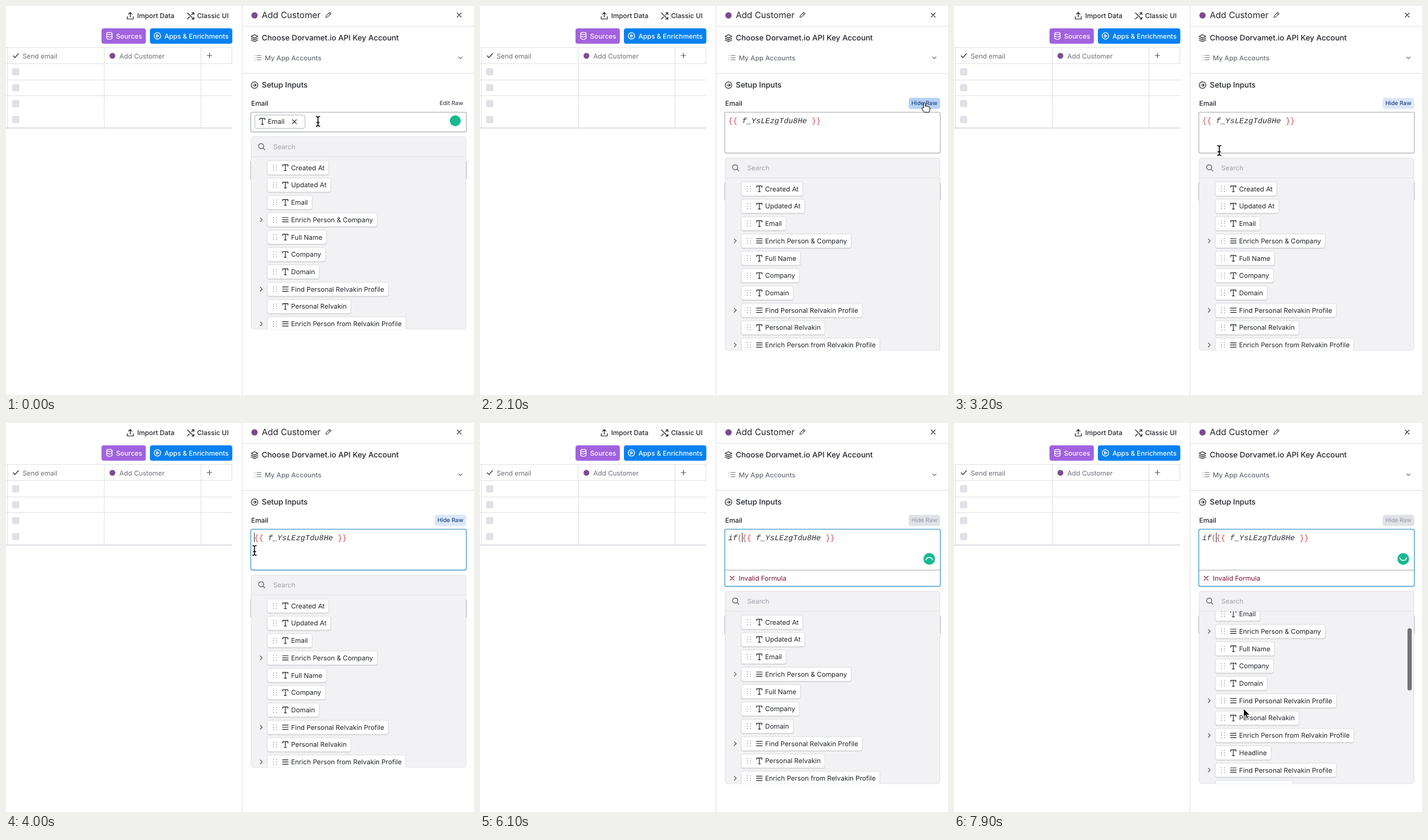
Recreate the animation shown at these times as an HTML page. Size 774 by 644 pixels, loop 8000 ms.

```html
<!DOCTYPE html>
<html lang="en">
<head>
<meta charset="utf-8">
<title>Edit raw formula</title>
<style>
html, body { margin: 0; width: 100%; height: 100%; overflow: hidden; background: #fff; }
svg { display: block; }
text { font: 400 11px Inter, sans-serif; fill: #22252b; white-space: pre; text-rendering: geometricPrecision; }
.m { font-weight: 500; }
.h { font-size: 12.6px; font-weight: 500; }
.s { font-size: 9.5px; font-weight: 500; }
.grey { fill: #6b7078; }
.w { fill: #fff; }
.code { font: italic 12.78px "Liberation Mono", monospace; fill: #2d2f36; }
.red { fill: #cf4a50; font-style: normal; }
.i { fill: none; stroke: #24272d; stroke-width: 1.2; stroke-linecap: round; stroke-linejoin: round; }
.line { fill: none; stroke: #e1e2e7; }
.chip { fill: #fff; stroke: #dcdde2; filter: drop-shadow(0 1px .6px #0002); }
.hover .chip { filter: drop-shadow(0 1px 1.2px #0006); }
</style>
</head>
<body>
<svg id="stage" width="774" height="644" viewBox="0 0 774 644">
  <defs>
    <clipPath id="view"><path d="M406 250H760.500V531q0 4-4 4H410q-4 0-4-4z"/></clipPath>
    <path id="T" class="i" d="M-4.300-2.500V-4.800H4.300V-2.500M0-4.800V4.800M-1.800 4.800H1.800"/>
    <path id="bars" class="i" d="M-4.800-3.600H4.800M-4.800 0H4.800M-4.800 3.600H4.800"/>
    <path id="cross" class="i" d="M-3.300-3.300L3.300 3.300M3.300-3.300L-3.300 3.300"/>
  </defs>

  <!-- table side -->
  <path class="i" d="M205.500 18.500V11M202.500 13.700L205.500 10.700 208.500 13.700M200.500 17.500V21.500H210.500V17.500"/>
  <text class="m" x="217" y="20">Import Data</text>
  <path class="i" d="M300 11.500L310.500 21.500M300 21.500L303.500 18M307 14.500L310.500 11.500M307.500 11.200H310.800V14.500M307.500 21.700H310.800V18.400"/>
  <text class="m" x="316" y="20">Classic UI</text>
  <rect x="158" y="37" width="73.300" height="25.400" rx="4" fill="#a162df"/>
  <rect x="238" y="37" width="136.300" height="25.400" rx="4" fill="#0881f2"/>
  <g class="i" style="stroke:#fff">
    <ellipse cx="171" cy="45.500" rx="4.500" ry="1.800"/>
    <path d="M166.500 45.500V53.500Q171 57 175.500 53.500V45.500M166.500 49.500Q171 53 175.500 49.500"/>
    <circle cx="250.500" cy="49.500" r="5.300"/>
    <path d="M249 47.200V51.800L252.800 49.500Z"/>
  </g>
  <text class="m w" x="182" y="53.500">Sources</text>
  <text class="m w" x="262" y="53.500">Apps &amp; Enrichments</text>
  <path class="line" d="M0 68.500H374M0 95.500H374M0 122.500H374M0 148.500H374M2.500 68V202M162.500 68V202M322.500 68V202M373.500 68V95"/>
  <path class="line" d="M0 202H374" style="stroke:#d5d6dc;stroke-width:1.500"/>
  <path class="i" d="M12 82.500L14.800 85.300 20.500 79"/>
  <text x="27.500" y="86.500" class="grey">Send email</text>
  <circle cx="176" cy="82.500" r="4.800" fill="#7b4c8f"/>
  <text x="187.500" y="86.500" class="grey">Add Customer</text>
  <path class="i" style="stroke:#55585f" d="M332.500 82H340.500M336.500 78V86"/>
  <g id="boxes" fill="#e0e0e6"></g>

  <!-- side panel -->
  <path class="line" d="M390.500 0V644M391 33.500H774M391 111.500H774"/>
  <circle cx="411" cy="15.500" r="5.200" fill="#7b4c8f"/>
  <text x="423" y="20" style="font-size:14.300px">Add Customer</text>
  <path class="i" style="stroke:#55585f" d="M529 19L529.800 15.800 535.300 10.300 537.600 12.600 532 18.200ZM533.800 11.800L536.100 14.100"/>
  <use href="#cross" x="749.500" y="15"/>
  <path class="i" d="M411 47.500L416.500 50.300 411 53.100 405.500 50.300ZM405.500 53.300L411 56.100 416.500 53.300M405.500 56.200L411 59 416.500 56.200"/>
  <text class="h" x="423" y="57.300">Choose Dorvamet.io API Key Account</text>
  <path class="i" style="stroke:#6b7078" d="M415 82H422M415 85.500H422M415 89H422M411.800 82H412M411.800 85.500H412M411.800 89H412M748.800 84.500L751.500 87.200 754.200 84.500"/>
  <text class="m grey" x="428" y="89.500">My App Accounts</text>
  <circle class="i" cx="411" cy="131" r="5.400"/>
  <path class="i" d="M408.300 131H413.500M411.500 128.800L413.700 131 411.500 133.200"/>
  <text class="h" x="423" y="135.300">Setup Inputs</text>
  <text class="m" x="405.500" y="165">Email</text>
  <rect id="rawBg" x="709" y="152" width="52" height="18.500" rx="4"/>
  <text id="rawText" class="s" y="164.300"></text>

  <g id="drop">
    <path class="line" style="stroke:#c3c6cc" d="M404.500 257V287M761.500 257V287"/>
    <rect x="405.500" y="216.500" width="355" height="318.500" rx="4" fill="#f2f2f4" stroke="#e2e3e7"/>
    <path class="line" d="M406 249.500H760.500"/>
    <circle class="i" cx="422" cy="232" r="4.200" style="stroke:#55585f"/>
    <path class="i" style="stroke:#55585f" d="M425.200 235.200L428 238"/>
    <text x="442" y="237" style="fill:#a0a3aa">Search</text>
    <g clip-path="url(#view)">
      <g id="rows"></g>
      <rect id="thumb" x="750" width="7" height="103" rx="3.500" fill="#737376"/>
    </g>
  </g>

  <rect id="field" x="404.800" y="175.900" width="356.600" rx="3" fill="#fff" stroke-width="1.300"/>
  <g id="pill">
    <rect x="411.500" y="180.500" width="83" height="22" rx="3" fill="#fff" stroke="#b4b8bf"/>
    <use href="#T" x="424" y="191"/>
    <text x="433" y="195">Email</text>
    <use href="#cross" x="477" y="191.500"/>
  </g>
  <g id="raw">
    <text class="code" x="410.500" y="194"><tspan id="typed"></tspan><tspan id="paren" class="red"></tspan><tspan class="red">{{</tspan> f_YsLEzgTdu8He <tspan class="red">}}</tspan></text>
    <path id="caret" d="M0 181.500V197.500" stroke="#26282e"/>
  </g>
  <g id="error">
    <path d="M405 243.500H761" stroke="#a9adb5"/>
    <path class="i" style="stroke:#7d1230" d="M413.700 253.700L420.300 260.300M420.300 253.700L413.700 260.300"/>
    <text x="428" y="261" style="fill:#7d1230">Invalid Formula</text>
  </g>
  <g id="badge">
    <circle r="9" fill="#15b98f"/>
    <path id="spin" d="M-1.500-5.100A5.300 5.300 0 0 1 -1.500 5.100" fill="none" stroke="#fff" stroke-width="1.500" stroke-linecap="round"/>
  </g>

  <g id="mouse">
    <path id="arrow" d="M0 0V14L3.300 11 5.500 16 7.900 15 5.700 10.200H10.200Z" fill="#000" stroke="#fff" stroke-width=".9"/>
    <path id="beam" class="i" style="stroke:#000;stroke-width:1.500" d="M-3-8Q0-8 0-6Q0-8 3-8M0-6V6M-3 8Q0 8 0 6Q0 8 3 8M-2 2H2"/>
    <g fill="#fff" stroke="#000" stroke-linejoin="round">
      <path id="point" d="M-1.500 9V1Q0-1.500 1.500 1V6Q3 4.500 4.200 6.300Q6 5.200 6.900 7Q9 6.300 9 8.500V12L7.500 16H0L-4.500 10Q-4 7.500-1.500 9Z"/>
      <path id="palm" d="M-3.500 2.500L-5.500-3.500Q-5-6-3.300-4.500L-1.500-1 -2-6.500Q-.5-8.800.5-6.500L1-1.500 2-6.500Q3.500-8.300 4.300-6L3.800-.8 5.300-4Q7-5 7.200-3L5.800 4 4.500 8H-3L-8 1.800Q-8-.5-6-.2Z"/>
    </g>
  </g>
</svg>

<script>
const $ = id => document.getElementById(id);
const show = (id, on) => $(id).setAttribute("display", on ? "inline" : "none");
const put = (id, attrs) => {
  for (const k in attrs) $(id).setAttribute(k, attrs[k]);
};

const LOOP = 8000, PITCH = 28.72, CHAR = 7.67;
const FOCUS = 300, OPEN = 1900, REFOCUS = 3800, TYPE = 4500, FAIL = 5100, BACK = 7100, GRAB = 7400, SCROLL = 7700;

// A leading ">" marks an expandable group.
const fields = ["Created At", "Updated At", "Email", ">Enrich Person & Company", "Full Name",
  "Company", "Domain", ">Find Personal Relvakin Profile", "Personal Relvakin",
  ">Enrich Person from Relvakin Profile", "Headline", ">Find Personal Relvakin Profile", "Personal Emails"];

// time, x, y, shape; positions are linear between stops
const path = [
  [0, 516, 191, "beam"], [100, 511, 191, "beam"], [200, 511, 191, "beam"], [600, 470, 190, "arrow"],
  [1000, 418, 188, "arrow"], [1200, 414, 187, "arrow"], [1300, 500, 184, "arrow"], [1400, 650, 172, "arrow"],
  [1500, 726, 160, "point"], [1600, 726, 160, "point"], [1800, 735, 160, "point"], [2200, 735, 160, "point"],
  [2400, 670, 158, "arrow"], [2500, 618, 158, "arrow"], [2800, 510, 215, "beam"], [3100, 450, 248, "beam"],
  [3400, 416, 222, "beam"], [3700, 411, 211, "beam"], [BACK, 411, 211, "beam"], [7200, 420, 270, "arrow"],
  [GRAB, 470, 450, "palm"], [7500, 479, 473, "palm"], [SCROLL, 479, 473, "arrow"], [LOOP, 479, 473, "arrow"]
];

function buildRows() {
  const dots = [-4, 0, 4].map(y => `<circle cx="442.300" cy="${y}" r=".9"/><circle cx="447.300" cy="${y}" r=".9"/>`).join("");
  $("rows").innerHTML = fields.map((f, i) => {
    const group = f[0] === ">", name = f.replace(">", "").replace("&", "&amp;");
    return `<g transform="translate(0 ${267.7 + i * PITCH})">
      <rect class="chip" x="432" y="-11.500" height="23" rx="3"/>
      <g fill="#a3a6ad">${dots}</g>
      <use href="#${group ? "bars" : "T"}" x="462"/>
      ${group ? '<path class="i" style="stroke:#55585f" d="M420.500-3.300L423.800 0 420.500 3.300"/>' : ""}
      <text x="471.500" y="4">${name}</text></g>`;
  }).join("");
  for (const row of $("rows").children)
    row.querySelector(".chip").setAttribute("width", 46.5 + row.querySelector("text").getComputedTextLength());
}

function pointer(t) {
  const i = path.findLastIndex(p => p[0] <= t);
  const a = path[i], b = path[i + 1] || a;
  const k = b === a ? 0 : (t - a[0]) / (b[0] - a[0]);
  put("mouse", { transform: `translate(${a[1] + (b[1] - a[1]) * k} ${a[2] + (b[2] - a[2]) * k})` });
  for (const s of ["arrow", "beam", "point", "palm"]) show(s, s === a[3]);
  show("mouse", t < TYPE || t >= BACK);
}

function draw(t) {
  const raw = t >= OPEN, bad = t >= FAIL;
  const focused = (t >= FOCUS && t < OPEN) || t >= REFOCUS;
  const shift = bad ? 62 : raw ? 35 : 0;

  put("field", { height: 32.6 + shift, stroke: focused ? "#459bd0" : "#b4b8be" });
  put("drop", { transform: `translate(0 ${shift})` });
  show("pill", !raw);
  show("raw", raw);
  show("error", bad);

  show("rawBg", raw);
  put("rawBg", { fill: bad ? "#e1e2e7" : t <= 2500 ? "#b5d3f6" : "#dbe7fa" });
  $("rawText").textContent = raw ? "Hide Raw" : "Edit Raw";
  put("rawText", { x: raw ? 713.5 : 717, style: "fill:" + (bad ? "#9b9fa9" : raw ? "#1c4686" : "#44474e") });

  const typed = t < TYPE ? 0 : Math.min(3, 1 + Math.floor((t - TYPE) / 200));
  $("typed").textContent = "if".slice(0, typed);
  $("paren").textContent = typed > 2 ? "(" : "";
  show("caret", t >= REFOCUS);
  put("caret", { transform: `translate(${410.8 + typed * CHAR} 0)` });

  show("badge", !raw || bad);
  put("badge", { transform: bad ? "translate(743 225) scale(1.08)" : "translate(743 190)" });
  show("spin", bad);
  put("spin", { transform: `rotate(${270 + 0.9 * (t - 6100)})` });

  const k = Math.max(0, (t - SCROLL + 100) / 300);
  const scroll = 71 * k ** 1.4;
  put("rows", { transform: `translate(0 ${-scroll})` });
  put("thumb", { y: 252.5 + scroll * 0.356 });
  show("thumb", t >= SCROLL);
  $("rows").children[5].classList.toggle("hover", t >= GRAB && t < SCROLL);
  pointer(t);
}

$("boxes").innerHTML = [109, 135.3, 161.5, 188].map(y => `<rect x="10" y="${y - 6}" width="12" height="12" rx="3"/>`).join("");
buildRows();

// The picture advances ten times a second.
function tick(now) {
  draw(Math.floor(now % LOOP / 100) * 100);
  requestAnimationFrame(tick);
}
draw(0);
requestAnimationFrame(tick);
</script>
</body>
</html>
```
